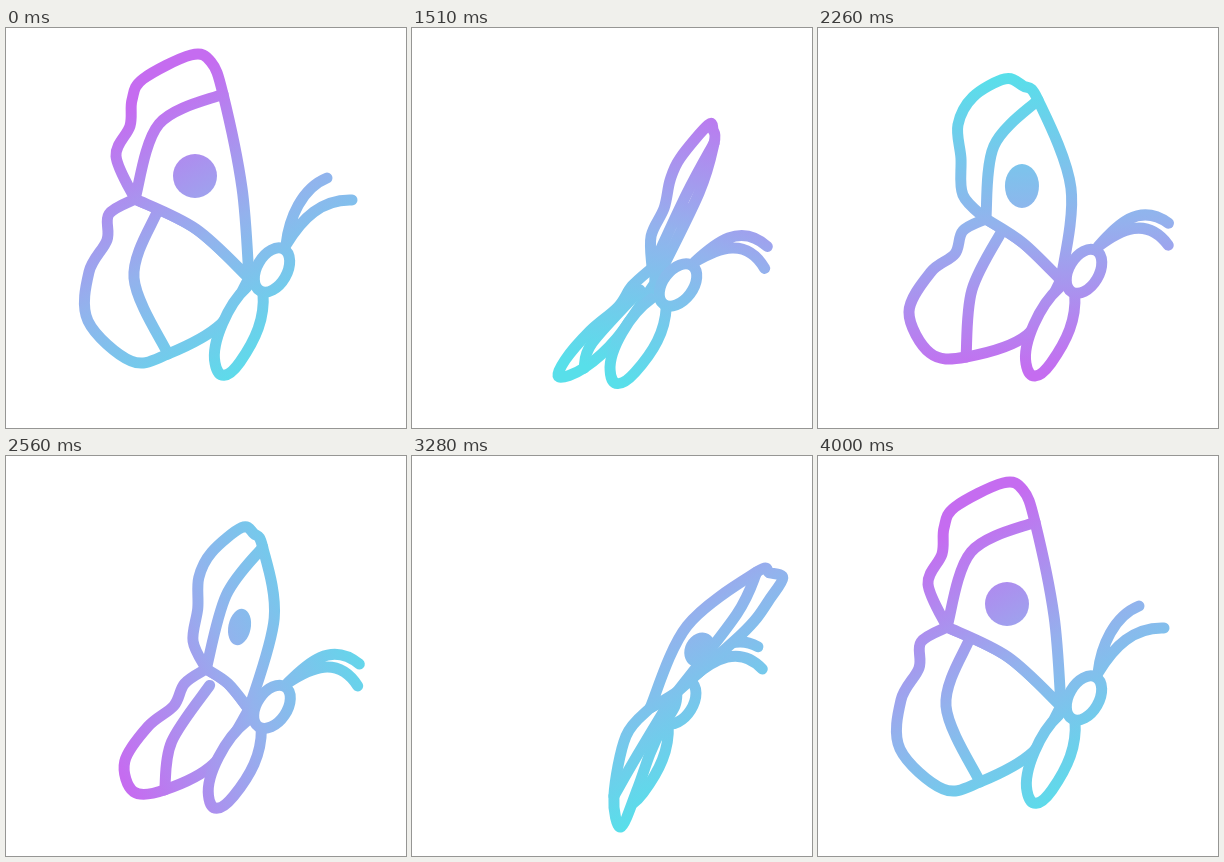
Write an HTML page with a canvas that moves like this. It is 400 px wide and 400 px high and loops after 4030 ms.

```html
<!DOCTYPE html>
<html lang="en">
<head>
<meta charset="utf-8">
<title>Butterfly</title>
<style>
  html, body { margin: 0; height: 100%; overflow: hidden; background: #fff; }
  canvas { display: block; width: 400px; height: 400px; }
</style>
</head>
<body>
<canvas id="stage" width="400" height="400"></canvas>
<script>
const ctx = document.getElementById('stage').getContext('2d');
const LOOP = 4030, STEP = 30, START = 1005, BEAT = 406, SETTLE = 3215, END = 4000;

// Wing poses: outline and vein points, then the dot (x, y, rx, ry, tilt in degrees).
const open = [243,250, 236,160, 217,66, 205,34, 185,27, 137,51, 126,72, 124,98, 110,128, 129,171,
  190,201, 153,96, 103,186, 101,212, 83,244, 82,293, 125,333, 162,326, 215,296, 151,184, 128,250,
  189,148,22,22,0];
const raised = [243,252, 253,160, 220,72, 205,58, 187,51, 155,69, 140,97, 143,130, 145,167, 168,191,
  205,215, 176,118, 145,203, 137,226, 113,244, 91,284, 112,325, 148,329, 209,307, 184,203, 154,262,
  204,158,17,22,0];
const edgeOn = [243,255, 287,165, 302,115, 301,102, 296,97, 268,130, 258,152, 252,180, 239,208, 240,240,
  243,243, 275,165, 220,258, 206,279, 178,303, 153,332, 147,349, 172,340, 205,310, 228,262, 180,315,
  270,187,4,14,25];
const turned = [238,252, 275,170, 345,116, 358,117, 371,122, 358,143, 345,162, 330,178, 300,205, 265,236,
  254,243, 325,158, 263,250, 250,272, 238,298, 226,332, 209,371, 202,340, 214,280, 258,245, 225,300,
  288,194,15,18,28];
const folded = [232,260, 284,196, 371,149, 386,150, 401,157, 396,178, 378,207, 350,226, 322,252, 284,264,
  257,258, 340,210, 287,280, 275,300, 254,325, 235,358, 207,384, 193,357, 206,300, 275,267, 233,312,
  300,219,16,20,32];
const poses = [[0, open], [0.16, raised], [0.96, edgeOn], [1.7, turned], [2, folded]];

const antennaUp = [280,217, 283,190, 296,160, 321,150, 280,217, 296,190, 316,171, 346,172];
const antennaDown = [280,217, 298,196, 320,172, 350,193, 280,217, 302,200, 328,186, 350,215];

const clamp = x => Math.min(1, Math.max(0, x));
const ease = x => (1 - Math.cos(Math.PI * clamp(x))) / 2;
const mix = (a, b, f) => a.map((v, i) => v + (b[i] - v) * f);

function wingPose(turn) {
  let i = 1;
  while (i < poses.length - 1 && turn > poses[i][0]) i++;
  const [k0, a] = poses[i - 1], [k1, b] = poses[i];
  return mix(a, b, (turn - k0) / (k1 - k0));
}

// Smooth curve through points; joins on to the current path unless it is new.
function curve(points, fresh = true) {
  const at = i => points[Math.max(0, Math.min(points.length - 1, i))];
  if (fresh) ctx.moveTo(...points[0]);
  for (let i = 0; i < points.length - 1; i++) {
    const [p, a, b, n] = [at(i - 1), at(i), at(i + 1), at(i + 2)];
    ctx.bezierCurveTo(a[0] + (b[0] - p[0]) / 6, a[1] + (b[1] - p[1]) / 6,
      b[0] - (n[0] - a[0]) / 6, b[1] - (n[1] - a[1]) / 6, ...b);
  }
}

function paint(paper, trace) {
  ctx.beginPath();
  trace();
  if (paper) {
    ctx.fillStyle = '#fff';
    ctx.fill();
  }
  ctx.stroke();
}

function drawWing(turn, ink) {
  const w = wingPose(turn);
  const pick = (...ids) => ids.map(i => [w[2 * i], w[2 * i + 1]]);
  paint(true, () => {
    curve(pick(9, 12, 13, 14, 15, 16, 17, 18, 0));
    curve(pick(0, 10, 9), false);
    ctx.closePath();
  });
  paint(false, () => curve(pick(19, 20, 17)));
  paint(true, () => {
    curve(pick(0, 1, 2, 3, 4, 5, 6, 7, 8, 9));
    curve(pick(9, 10, 0), false);
    ctx.closePath();
  });
  paint(false, () => curve(pick(2, 11, 9)));
  const [x, y, rx, ry, tilt] = w.slice(42);
  ctx.beginPath();
  ctx.ellipse(x, y, rx, ry, tilt * Math.PI / 180, 0, 7);
  ctx.fillStyle = ink;
  ctx.fill();
}

function drawBody(bob, droop) {
  const a = mix(antennaUp, antennaDown, droop);
  ctx.save();
  ctx.translate(266, 242 + 15 * bob);
  ctx.rotate(bob * 7 * Math.PI / 180);
  ctx.translate(-266, -242);
  paint(false, () => {
    for (const i of [0, 8]) {
      ctx.moveTo(a[i], a[i + 1]);
      ctx.bezierCurveTo(...a.slice(i + 2, i + 8));
    }
  });
  paint(true, () => {
    ctx.moveTo(241, 259);
    ctx.bezierCurveTo(222, 276, 205, 315, 209, 335);
    ctx.bezierCurveTo(212, 352, 222, 351, 234, 334);
    ctx.bezierCurveTo(250, 311, 259, 290, 257, 265);
  });
  paint(true, () => ctx.ellipse(266, 242, 15, 24, Math.PI / 6, 0, 7));
  ctx.restore();
}

function gradient(time) {
  const angle = Math.PI / 3 + 2 * Math.PI * ease((time - 1000) / 2300);
  const dx = 150 * Math.cos(angle), dy = 150 * Math.sin(angle);
  const g = ctx.createLinearGradient(225 - dx, 195 - dy, 225 + dx, 195 + dy);
  ['#c56cf0', '#93b2ed', '#58dfea'].forEach((c, i) => g.addColorStop(i / 2, c));
  return g;
}

// Steady beats, then one slow opening back to rest.
function wingAngle(time) {
  const beat = t => 2 * Math.PI * (Math.max(0, t - START) / BEAT % 1);
  if (time < SETTLE) return beat(time);
  return beat(SETTLE) * (1 - clamp((time - SETTLE) / (END - SETTLE))) ** 2;
}

function draw(now) {
  const time = Math.floor((now % LOOP - 10) / STEP) * STEP + 10;
  const angle = wingAngle(time);
  const turn = 1 - Math.cos(angle);
  const bob = Math.sin(angle) ** 4;
  const droop = ease((time - START) / 400) - ease((time - 3060) / 740);
  const ink = gradient(time);

  ctx.clearRect(0, 0, 400, 400);
  ctx.lineWidth = 11;
  ctx.lineCap = ctx.lineJoin = 'round';
  ctx.strokeStyle = ink;
  const layers = [() => drawWing(turn, ink), () => drawBody(bob, droop)];
  if (turn > 1.1) layers.reverse();
  layers.forEach(layer => layer());
}

const begin = performance.now();
function frame() {
  draw(performance.now() - begin);
  requestAnimationFrame(frame);
}
frame();
</script>
</body>
</html>
```
